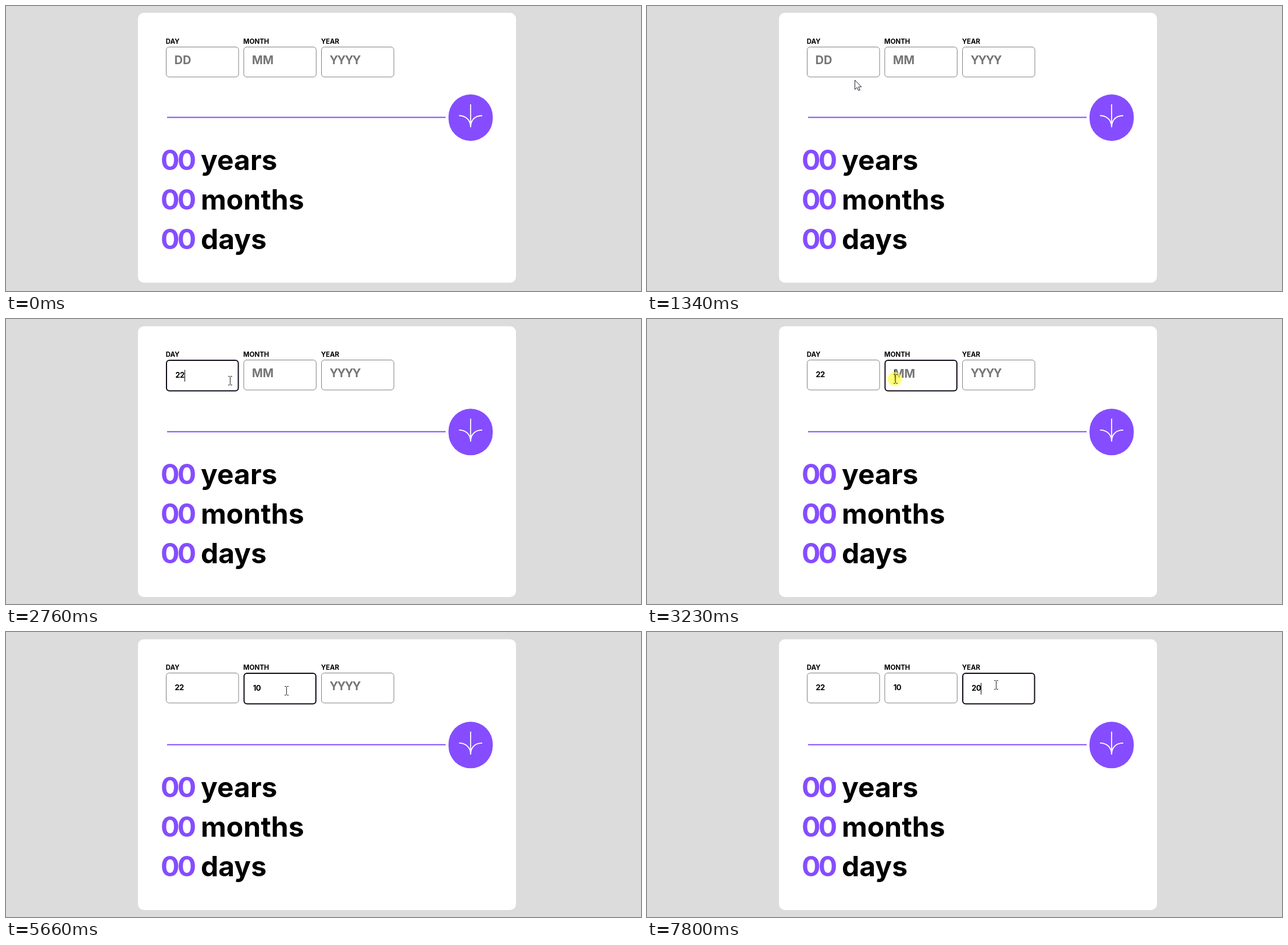
An HTML page that plays this animation: 1092 by 490 pixels, repeating every 8000 ms.

```html
<!DOCTYPE html>
<html lang="en">
<head>
<meta charset="utf-8">
<title>Age calculator</title>
<style>
  html, body { margin: 0; height: 100%; overflow: hidden; background: #dcdcdc; }
  svg { display: block; width: 1092px; height: 490px; }
  text { font: 700 48px Inter, "Open Sans", sans-serif; font-optical-sizing: none; }
  .label { font-size: 11.4px; }
  .hint { font-size: 20px; fill: #757575; }
  .value { font-size: 13px; letter-spacing: -.5px; }
  .zero { fill: #854dff; letter-spacing: -3.5px; }
</style>
</head>
<body>
<svg viewBox="0 0 1092 490">
  <rect id="card" x="227" y="12" width="650" rx="10" fill="#fff"/>
  <g id="fields"></g>
  <g id="lower">
    <path d="M277 191.5H756" stroke="#854dff" stroke-width="2"/>
    <rect x="761" y="152" width="76" height="80" rx="38" fill="#854dff"/>
    <path d="M779 188.5C785.5 188.2 799 192 799 208.5V169M799 208.5C799 200 803 188.5 819 188.5"
      fill="none" stroke="#fff" stroke-width="1.8"/>
  </g>
  <circle id="glow" r="12" fill="#ff3" opacity=".65"/>
  <path id="arrow" d="M.5 .5V16.5L4.2 13L6.7 18.5L9.2 17.4L6.8 12H11.8Z" fill="#fff" stroke="#223" stroke-width="1"/>
  <path id="beam" d="M-3.5 -7.5H-1L0 -6.5L1 -7.5H3.5M0 -6.5V6.5M-3.5 7.5H-1L0 6.5L1 7.5H3.5"
    fill="none" stroke="#222" stroke-width="1"/>
</svg>
<script>
const LOOP = 8000, TICK = 69, BLINK = 530;
const $ = id => document.getElementById(id);

function add(parent, tag, attrs, text = "") {
  const el = document.createElementNS("http://www.w3.org/2000/svg", tag);
  set(el, attrs);
  el.textContent = text;
  return parent.appendChild(el);
}
function set(el, attrs) {
  for (const k in attrs) el.setAttribute(k, attrs[k]);
}
const show = (el, on) => set(el, { visibility: on ? "visible" : "hidden" });

// keys: [time, typed value]
const fields = [
  { label: "DAY", hint: "DD", x: 275, focus: 1690, blur: 3230, keys: [[2150, "2"], [2420, "22"]] },
  { label: "MONTH", hint: "MM", x: 408.4, focus: 3230, blur: 6070, keys: [[4850, "1"], [4920, "10"]] },
  { label: "YEAR", hint: "YYYY", x: 542, focus: 6070, blur: LOOP, keys: [[7470, "2"], [7800, "20"]] }
];
for (const f of fields) {
  const g = $("fields");
  add(g, "text", { class: "label", x: f.x - .3, y: 65 }, f.label);
  f.box = add(g, "rect", { fill: "#fff" });
  f.hintText = add(g, "text", { class: "hint", "letter-spacing": f.hint === "YYYY" ? -1.5 : 0 }, f.hint);
  f.valueText = add(g, "text", { class: "value" });
  f.caret = add(g, "rect", { y: 87.5, width: 1, height: 20 });
}
["years", "months", "days"].forEach((unit, i) => {
  const y = 282 + 68 * i;
  add($("lower"), "text", { class: "zero", x: 266, y }, "00");
  add($("lower"), "text", { x: 335, y }, unit);
});

// pointer moves: start, end, from, bend, to
const moves = [
  [500, 1270, [939, 468], [540, 300], [362, 136]],
  [1270, 1480, [362, 136], [351, 118], [345, 107]],
  [2620, 2900, [345, 107], [386, 107], [427, 103]],
  [3560, 3700, [427, 103], [440, 103], [453, 102]],
  [5520, 6000, [453, 102], [525, 101], [600, 91]]
];
const clicks = [[1690, 1820], [3230, 3360], [6070, 6210]];

function pointer(t) {
  const [start, end, a, b, c] = moves.filter(m => t >= m[0]).pop() || moves[0];
  const stepped = Math.floor((t - start) / TICK) * TICK;
  const p = Math.max(0, Math.min(1, stepped / (end - start)));
  const e = p * p * (3 - 2 * p), q = 1 - e;
  return a.map((v, i) => q * q * v + 2 * q * e * b[i] + e * e * c[i]);
}

function drawField(f, t) {
  const on = t >= f.focus && t < f.blur;
  const typed = f.keys.filter(k => t >= k[0]).pop();
  const value = typed ? typed[1] : "";
  const d = on ? 1 : 0;
  set(f.box, on
    ? { x: f.x + 1, y: 71, width: 123.5, height: 52.5, rx: 5, stroke: "#130a1a", "stroke-width": 2 }
    : { x: f.x + .5, y: 70.5, width: 124.5, height: 51.5, rx: 5, stroke: "#808080", "stroke-width": 1 });
  set(f.hintText, { x: f.x + 14.5 + d, y: 100 + d });
  show(f.hintText, !value);
  set(f.valueText, { x: f.x + 15.3 + d, y: 100 + d });
  f.valueText.textContent = value;
  const width = value ? f.valueText.getComputedTextLength() : 0;
  set(f.caret, { x: Math.round(f.x + 16.5 + width) });
  const since = t - (typed ? typed[0] : f.focus);
  show(f.caret, on && Math.floor(since / BLINK) % 2 === 0);
}

function draw(now) {
  const t = now % LOOP;
  const shifted = t >= fields[0].focus;
  set($("card"), { y: shifted ? 12.5 : 11.8, height: shifted ? 465.5 : 464 });
  set($("lower"), { transform: `translate(0 ${shifted ? 2.3 : 0})` });
  for (const f of fields) drawField(f, t);

  const [x, y] = pointer(t).map(Math.round);
  const inside = y > 70 && y < 122 && fields.some(f => x > f.x && x < f.x + 125);
  set($("arrow"), { transform: `translate(${x} ${y})` });
  set($("beam"), { transform: `translate(${x + .5} ${y})` });
  set($("glow"), { cx: x - 1, cy: y });
  show($("arrow"), t >= 500 && !inside);
  show($("beam"), t >= 500 && inside);
  show($("glow"), clicks.some(([a, b]) => t >= a && t < b));
  requestAnimationFrame(draw);
}
requestAnimationFrame(draw);
</script>
</body>
</html>
```
